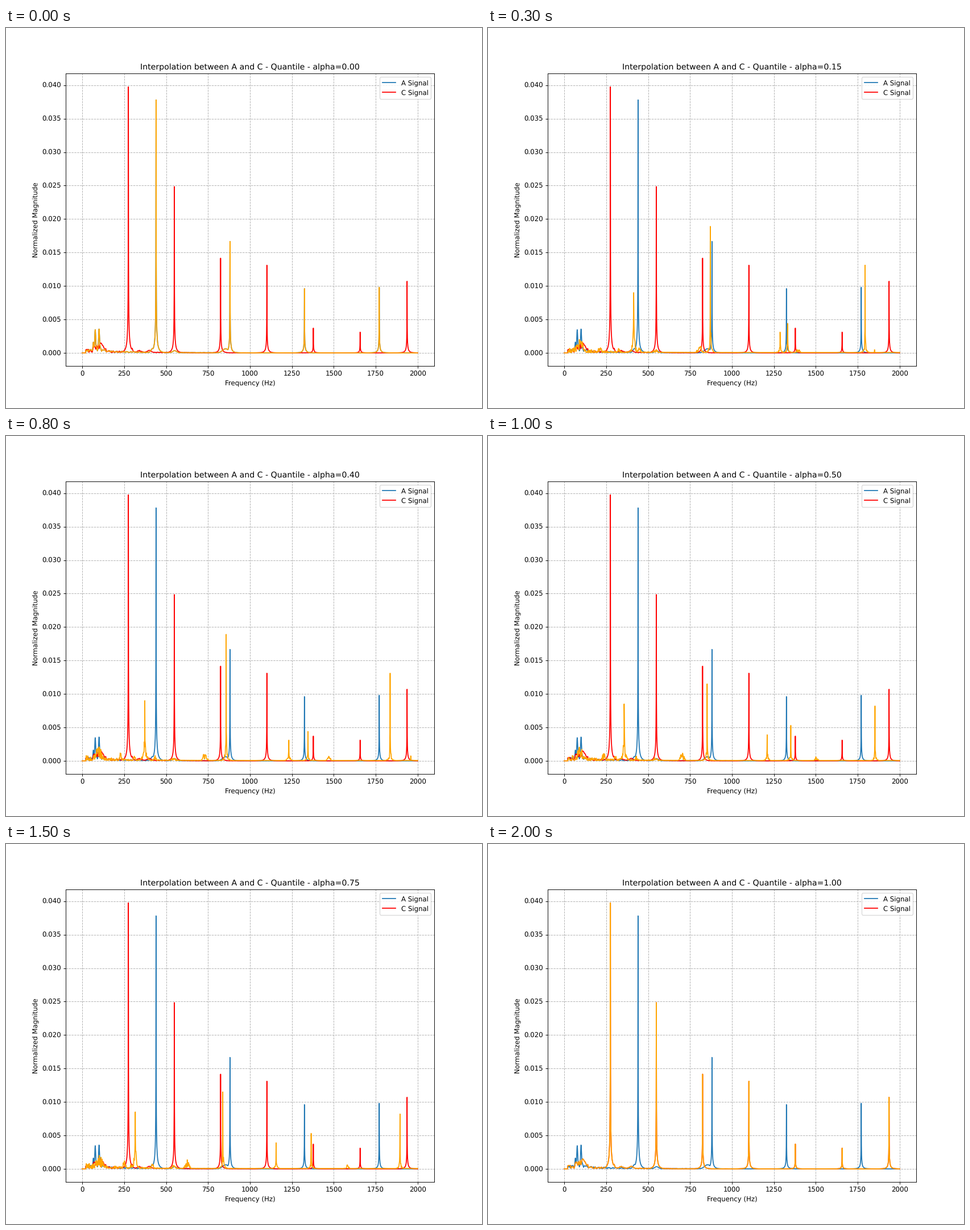
A matplotlib script for the animation above (2.1 s loop, 837 px wide and 669 px high).

```python
import numpy as np
import matplotlib.pyplot as plt
from matplotlib.animation import FuncAnimation

W, H, DPI = 837, 669, 83.7
STEPS = 21
TOP = 0.03975

plt.rcParams.update({"font.size": 10.17, "text.hinting": "none"})
freq = np.arange(0, 2001.0)


def lerp(a, b, t):
    return a + (b - a) * t


def partial(base, k, stiff):
    """Frequency of the k-th overtone of a slightly stiff string."""
    return base * k * (1 + stiff * k * k)


def note_a(k):
    return partial(440, k, 4e-4)


def note_c(k):
    return partial(274.5, k, 1.64e-4)


def peak(center, height, width=0.6):
    d = np.abs(freq - round(center))
    return height / (1 + d / width) * np.exp(-d / 25)


def bump(center, height, sigma):
    return height * np.exp(-0.5 * ((freq - center) / sigma) ** 2)


def rough(seed, step):
    """Seeded values in 0..1, one every `step` Hz, joined by straight lines."""
    knots = np.arange(0, 2001 + step, step)
    return np.interp(freq, knots, np.random.default_rng(seed).random(knots.size))


def spectrum(note, heights, bumps, hump, seed):
    level = bump(100, hump, 25) + 6e-4 * np.exp(-freq / 280) * (freq > 20)
    floor = level * (0.15 + 0.85 * rough(seed, 5))
    floor += sum(bump(*b) for b in bumps)
    peaks = [peak(note(k), h) for k, h in enumerate(heights, 1)]
    return np.maximum.reduce([floor, *peaks])


A_HEIGHTS = (0.0378, 0.01665, 0.0096, 0.0098)
C_HEIGHTS = (TOP, 0.02485, 0.01415, 0.0131, 0.0037, 0.0031, 0.0107)

sig_a = spectrum(note_a, A_HEIGHTS, [
    (66, 0.0010, 2), (77, 0.0029, 2.5), (100, 0.0028, 2.5),
    (420, 0.0006, 9), (550, 0.0003, 10), (855, 0.0006, 18)], 0.0006, 4)
sig_c = spectrum(note_c, C_HEIGHTS, [
    (265, 0.0005, 4), (296, 0.0006, 4), (340, 0.0003, 9),
    (400, 0.0003, 10), (1098, 0.0014, 1)], 0.0012, 9)

# Overtone of A, overtone of C it travels to, offset, early and late height
MOVERS = [
    (1, 1, -1, 0.0090, 0.0085),
    (2, 3, -2, 0.0189, 0.0115),
    (3, 4, -5, 0.0031, 0.0039),
    (3, 5, -1, 0.0044, 0.0053),
    (4, 7, -2, 0.0131, 0.0082),
]

# Travelling patches of noise: start, end, height, spread
PATCHES = [
    (90, 105, 0.0022, 20),
    (204, 266, 0.0013, 8),
    (335, note_c(1), 0.0008, 6),
    (455, 405, 0.0008, 8),
    (545, 545, 0.0006, 12),
    (853, note_c(2), 0.0014, 11),
    (1348, note_c(6), 0.0007, 9),
    (1786, note_c(8), 0.0008, 1),
]


def blend(step):
    if step == 0:
        return sig_a
    if step == STEPS - 1:
        return sig_c
    t = step / (STEPS - 1)
    grain = rough(50 + step, 2)
    hiss = 9e-4 * np.exp(-freq / 220) * grain ** 2 + 6e-5
    layers = [hiss * (freq > 20)]
    for start, end, height, spread in PATCHES:
        layers.append(bump(lerp(start, end, t), height, spread)
                      * (0.15 + 0.85 * grain))
    for k, m, offset, early, late in MOVERS:
        pos = lerp(note_a(k) + offset, note_c(m), t)
        height = early if t < 0.5 else late
        width = 0.6 * max(1, A_HEIGHTS[k - 1] / height)
        jitter = np.where(freq == round(pos), 1, 0.3 + 0.8 * grain)
        layers.append(peak(pos, height, width) * jitter)
    return np.maximum.reduce(layers)


fig, ax = plt.subplots(figsize=((W + 1e-6) / DPI, (H + 1e-6) / DPI), dpi=DPI)
ax.plot(freq, sig_a, label="A Signal")
ax.plot(freq, sig_c, color="red", label="C Signal")
mix, = ax.plot(freq, sig_a, color="orange")
ax.set_xlim(-100, 2100)
ax.set_ylim(-0.05 * TOP, 1.05 * TOP)
ax.set_xlabel("Frequency (Hz)")
ax.set_ylabel("Normalized Magnitude")
title = ax.set_title("")
ax.grid(True, linestyle="--")
ax.legend(loc="upper right")


def update(step):
    mix.set_ydata(blend(step))
    alpha = step / (STEPS - 1)
    title.set_text(f"Interpolation between A and C - Quantile - alpha={alpha:.2f}")
    return mix, title


anim = FuncAnimation(fig, update, frames=STEPS, interval=100, repeat=True)
plt.show()
```
